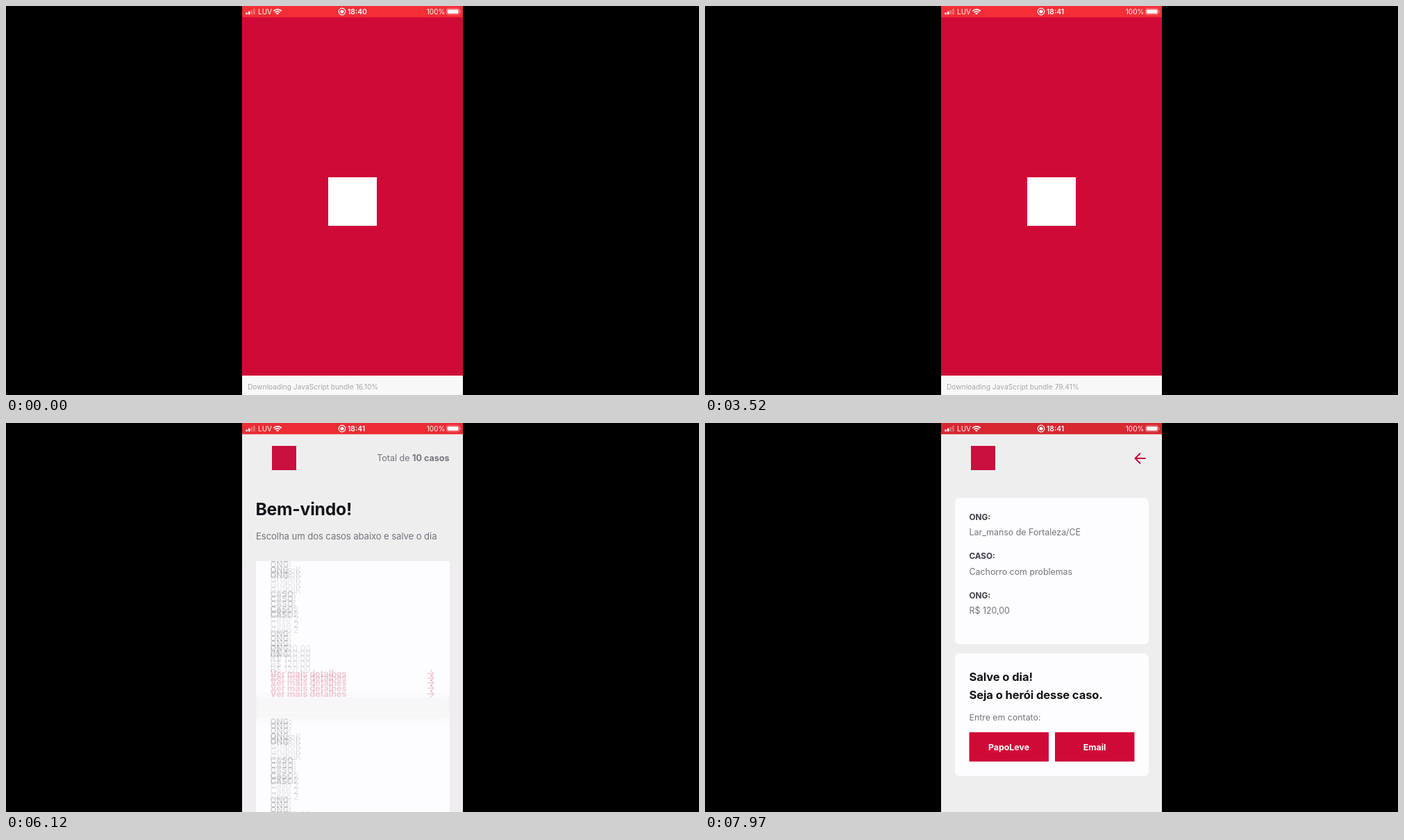
These frames come from a looping animation (998 by 561 pixels, 8000 ms). An HTML page with a canvas:

```html
<!DOCTYPE html>
<html lang="pt-BR">
<head>
<meta charset="utf-8">
<title>App de casos</title>
<style>
  html, body { margin: 0; width: 100%; height: 100%; overflow: hidden; background: #000; }
  canvas { display: block; }
</style>
</head>
<body>
<canvas id="stage" width="998" height="561"></canvas>
<script>
const W = 998, H = 561;
const LEFT = 340, PHONE_W = 318;
const LIST_TOP = 199.5, PITCH = 240, CARD_H = 226.4;
const RED = '#d00a37', LINK = '#c40a3c', PAGE = '#efeeef', CARD = '#fdfcff';
const LABEL = '#3d3d47', BODY = '#73737c', INK = '#13131a';
const LOOP = 8000;

// Times of the main events, in ms
const T = { minute: 770, app: 5000, toastOut: 5640, swipe1: 5646, swipe2: 6380, push: 7420 };

const screenCtx = document.getElementById('stage').getContext('2d');
const layer = Object.assign(document.createElement('canvas'), { width: W, height: H });
const layerCtx = layer.getContext('2d');
let ctx = screenCtx;

const cases = Array.from({ length: 10 }, () => ['GrupoK', 'Caso 2', 'R$ 120,00']);
cases[1][1] = 'Teste insert';
cases[9] = ['Lar_manso', 'Cachorro com problemas', 'R$ 120,00'];

const clamp = (v, a = 0, b = 1) => Math.min(b, Math.max(a, v));
const lerp = (a, b, p) => a + (b - a) * p;

// y is the middle of the capital letters
function text(str, x, y, size, color, { weight = 400, align = 'left', spacing = 0 } = {}) {
  ctx.font = `${weight} ${size}px Inter, sans-serif`;
  ctx.letterSpacing = spacing + 'px';
  ctx.textAlign = align;
  ctx.fillStyle = color;
  ctx.fillText(str, x, y + size * 0.364);
  return ctx.measureText(str).width;
}

function rect(x, y, w, h, color, r = 0) {
  ctx.fillStyle = color;
  ctx.beginPath();
  ctx.roundRect(x, y, w, h, r);
  ctx.fill();
}

function clipped(x, y, w, h, draw) {
  ctx.save();
  ctx.beginPath();
  ctx.rect(x, y, w, h);
  ctx.clip();
  draw();
  ctx.restore();
}

// Arrow with its tip at (x, y); dir is 1 for right, -1 for left
function arrow(x, y, len, head, width, dir) {
  ctx.strokeStyle = LINK;
  ctx.lineWidth = width;
  ctx.lineCap = ctx.lineJoin = 'round';
  ctx.beginPath();
  ctx.moveTo(x - dir * len, y);
  ctx.lineTo(x, y);
  ctx.moveTo(x - dir * head, y - head);
  ctx.lineTo(x, y);
  ctx.lineTo(x - dir * head, y + head);
  ctx.stroke();
}

function fields(values, top) {
  ['ONG:', 'CASO:', 'ONG:'].forEach((label, i) => {
    const y = top + 27.4 + i * 56.8;
    text(label, 380.5, y, 11.7, LABEL, { weight: 700 });
    text(values[i], 380.5, y + 21.9, 12.4, BODY);
  });
}

function caseCard(values, top) {
  rect(360, top, 279, CARD_H, CARD, 6.8);
  fields(values, top);
  text('Ver mais detalhes', 380.5, top + 198.2, 12.65, LINK, { weight: 700 });
  arrow(616, top + 198.2, 9, 4.4, 1.4, 1);
}

const logo = () => rect(383, 33, 35, 35, '#c9103f');

function scrollAt(t) {
  const fling = (start, dist, tau) => t < start ? 0 : dist * (1 - Math.exp((start - t) / tau));
  return fling(T.swipe1, 834.5, 200) + Math.min(1200, fling(T.swipe2, 1206, 150));
}

function list(scroll) {
  rect(LEFT, LIST_TOP, PHONE_W, H - LIST_TOP, PAGE);
  cases.forEach((values, i) => {
    const top = LIST_TOP + i * PITCH - scroll;
    if (top < H && top + CARD_H > LIST_TOP) caseCard(values, top);
  });
}

// Equal mix of the last few positions leaves a trail while the list moves
function blurredList(t) {
  for (let k = 0; k < 5; k++) {
    ctx = layerCtx;
    list(scrollAt(t - 16 * k));
    ctx = screenCtx;
    ctx.globalAlpha = 1 / (k + 1);
    ctx.drawImage(layer, 0, 0);
  }
  ctx.globalAlpha = 1;
}

function homePage(t) {
  rect(LEFT, 0, PHONE_W, H, PAGE);
  logo();
  const bold = text('10 casos', 638.5, 50.5, 12.55, BODY, { weight: 700, align: 'right' });
  text('Total de ', 638.5 - bold, 50.5, 12.55, BODY, { align: 'right' });
  text('Bem-vindo!', 359.5, 123.7, 24.7, INK, { weight: 700, spacing: -0.25 });
  text('Escolha um dos casos abaixo e salve o dia', 360, 162.7, 13.2, BODY, { spacing: -0.12 });
  clipped(LEFT, LIST_TOP, PHONE_W, H - LIST_TOP, () => blurredList(t));
}

function toast(t) {
  const alpha = 1 - clamp((t - T.toastOut) / 200);
  if (!alpha) return;
  ctx.save();
  ctx.globalAlpha = alpha;
  rect(LEFT, 522, PHONE_W, H - 522, 'rgba(40,40,40,0.9)');
  text('Refreshed', 499, 538.3, 12.3, '#fff', { align: 'center' });
  text("Don't see your changes? Reload the app", 499.5, 553, 11.5, '#d8d8d8', { align: 'center' });
  ctx.restore();
}

function button(label, x) {
  rect(x, 446, 114.5, 42.3, RED, 1);
  text(label, x + 57, 467, 12.4, '#fff', { weight: 700, align: 'center' });
}

function detailPage() {
  rect(LEFT, 0, PHONE_W, H, PAGE);
  logo();
  arrow(619.5, 51, 14.5, 7, 2, -1);
  rect(360, 108, 279, 211, CARD, 6.8);
  fields(['Lar_manso de Fortaleza/CE', ...cases[9].slice(1)], 108);
  rect(360, 332, 279, 177, CARD, 6.8);
  const title = { weight: 700, spacing: -0.1 };
  text('Salve o dia!', 380.5, 366, 16.55, INK, title);
  text('Seja o herói desse caso.', 380.5, 391.5, 16.55, INK, title);
  text('Entre em contato:', 380.5, 425, 12.35, BODY);
  button('PapoLeve', 380.5);
  button('Email', 504);
}

function app(t) {
  const p = clamp((t - T.push) / 480);
  const slide = 1 - Math.pow(1 - p, 4);
  if (slide < 1) {
    ctx.save();
    ctx.translate(-0.3 * PHONE_W * slide, 0);
    homePage(t);
    ctx.restore();
    toast(t);
  }
  if (slide > 0) {
    ctx.save();
    ctx.translate(PHONE_W * (1 - slide), 0);
    detailPage();
    ctx.restore();
  }
}

function percentAt(t) {
  const marks = [[0, 16.1], [1520, 55.08], [3520, 79.41], [T.app - 40, 100]];
  const now = Math.floor(t / 80) * 80;
  const i = now < 1520 ? 0 : now < 3520 ? 1 : 2;
  const [t0, a] = marks[i], [t1, b] = marks[i + 1];
  return lerp(a, b, clamp((now - t0) / (t1 - t0)));
}

function splash(t) {
  rect(LEFT, 0, PHONE_W, H, RED);
  rect(464, 247, 70, 70, '#fff');
  rect(LEFT, 533, PHONE_W, H - 533, '#f9f8f9');
  text(`Downloading JavaScript bundle ${percentAt(t).toFixed(2)}%`, 348, 549.3, 10.2, '#a5a5a8');
}

function wifi(x, y) {
  ctx.strokeStyle = ctx.fillStyle = '#fff';
  ctx.lineWidth = 1.7;
  ctx.lineCap = 'butt';
  for (const r of [4.8, 7.7]) {
    ctx.beginPath();
    ctx.arc(x, y, r, -Math.PI * 0.76, -Math.PI * 0.24);
    ctx.stroke();
  }
  ctx.beginPath();
  ctx.moveTo(x, y);
  ctx.arc(x, y, 2.8, -Math.PI * 0.76, -Math.PI * 0.24);
  ctx.fill();
}

function statusBar(t) {
  // The recording bar pulses every 1.2 s
  const glow = 0.5 - 0.5 * Math.cos((t - 5340) / 1200 * 2 * Math.PI);
  const mix = (a, b) => Math.round(lerp(a, b, glow));
  rect(LEFT, 0, PHONE_W, 16.3, `rgb(${mix(202, 246)},${mix(36, 46)},${mix(46, 55)})`);

  [2.8, 4.4, 6.4, 8.4].forEach((h, i) =>
    rect(345.3 + i * 3.6, 12.2 - h, 2.6, h, i < 2 ? '#fff' : 'rgba(255,255,255,0.3)', 0.6));
  text('LUV', 363, 8.3, 10, '#fff');
  wifi(391, 12.6);

  const minute = t < T.minute ? '40' : '41';
  ctx.strokeStyle = '#fff';
  ctx.lineWidth = 1.2;
  ctx.beginPath();
  ctx.arc(484, 8, 4.8, 0, 2 * Math.PI);
  ctx.stroke();
  rect(481.4, 5.4, 5.2, 5.2, '#fff', 2.6);
  text('18:' + minute, 492, 8.3, 10.3, '#fff', { weight: 600 });

  text('100%', 632.3, 8.3, 10, '#fff', { align: 'right' });
  ctx.strokeStyle = 'rgba(255,255,255,0.5)';
  ctx.lineWidth = 0.8;
  ctx.beginPath();
  ctx.roundRect(634.4, 3.6, 18.4, 8.8, 2.4);
  ctx.stroke();
  rect(635.7, 4.9, 15.8, 6.2, '#fff', 1.4);
  rect(653.5, 6.5, 1.1, 3, 'rgba(255,255,255,0.5)', 0.5);
}

function draw(t) {
  rect(0, 0, W, H, '#000');
  clipped(LEFT, 0, PHONE_W, H, () => {
    if (t < T.app) splash(t);
    else app(t);
    statusBar(t);
  });
}

let start;
function tick(now) {
  start ??= now;
  draw((now - start) % LOOP);
  requestAnimationFrame(tick);
}
draw(0);
requestAnimationFrame(tick);
</script>
</body>
</html>
```
